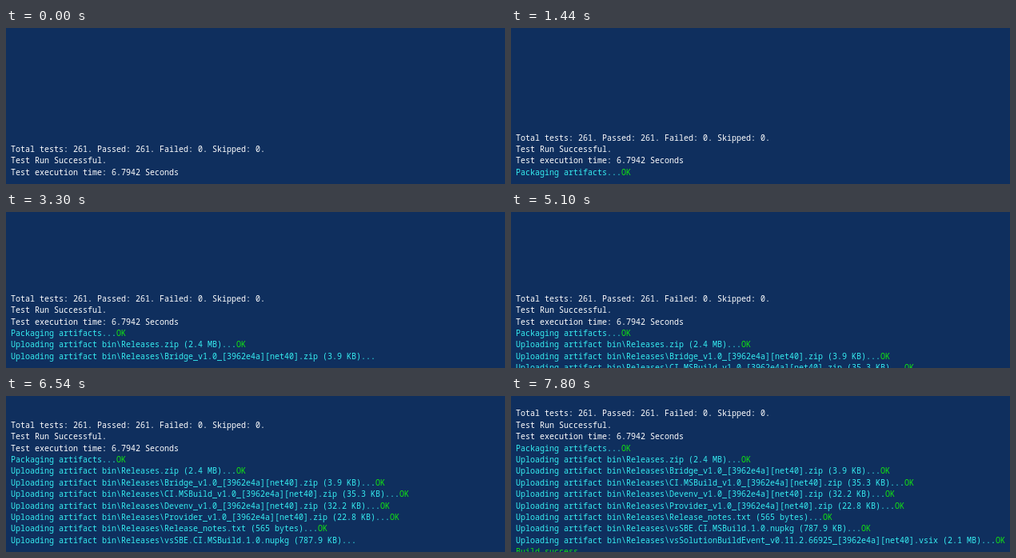
An HTML page with a canvas that plays this animation: 624x195 px, repeating every 8 s.

```html
<!DOCTYPE html>
<html lang="en">
<head>
<meta charset="utf-8">
<title>Build log</title>
<style>
html, body { margin: 0; width: 100%; height: 100%; overflow: hidden; background: #0f2f5e; }
canvas { display: block; }
</style>
</head>
<body>
<canvas id="stage" width="624" height="195"></canvas>
<script>
const ctx = document.getElementById('stage').getContext('2d');
const LOOP = 8000, LEFT = 6, CHAR = 6, PITCH = 14.4, BASE = 183.8;
const NAVY = '#0f2f5e', WHITE = '#ffffff', CYAN = '#36eef2', GREEN = '#12e412';

const upload = (file, size) => ({
  text: `Uploading artifact bin\\${file} (${size})...`, color: CYAN, ok: true
});
const tagged = (name, ext = 'zip') => `Releases\\${name}_[3962e4a][net40].${ext}`;

const lines = [
  { text: 'Total tests: 261. Passed: 261. Failed: 0. Skipped: 0.', color: WHITE },
  { text: 'Test Run Successful.', color: WHITE },
  { text: 'Test execution time: 6.7942 Seconds', color: WHITE },
  { text: 'Packaging artifacts...', color: CYAN, ok: true },
  upload('Releases.zip', '2.4 MB'),
  upload(tagged('Bridge_v1.0'), '3.9 KB'),
  upload(tagged('CI.MSBuild_v1.0'), '35.3 KB'),
  upload(tagged('Devenv_v1.0'), '32.2 KB'),
  upload(tagged('Provider_v1.0'), '22.8 KB'),
  upload('Releases\\Release_notes.txt', '565 bytes'),
  upload('Releases\\vsSBE.CI.MSBuild.1.0.nupkg', '787.9 KB'),
  upload(tagged('vsSolutionBuildEvent_v0.11.2.66925', 'vsix'), '2.1 MB'),
  { text: 'Build success', color: GREEN }
];

// time, index of the bottom full line, lines printed, lines finished
const steps = [
  [0, 2, 3, 3],
  [420, 3, 4, 3],
  [1320, 3, 4, 4],
  [1500, 4, 5, 4],
  [3240, 5, 6, 5],
  [4860, 5, 7, 6],
  [5040, 5, 7, 7],
  [5280, 8, 9, 8],
  [5940, 8, 10, 9],
  [6420, 10, 11, 10],
  [7260, 11, 12, 11],
  [7680, 11, 13, 12]
];

function print(text, col, y, color) {
  ctx.fillStyle = color;
  ctx.fillText(text, LEFT + col * CHAR, y);
}

function draw(t) {
  const [, bottom, printed, done] = steps.findLast(s => s[0] <= t);
  ctx.fillStyle = NAVY;
  ctx.fillRect(0, 0, 624, 195);
  ctx.font = '10px "Noto Sans Mono", "DejaVu Sans Mono", monospace';
  ctx.textBaseline = 'alphabetic';
  lines.slice(0, printed).forEach((line, i) => {
    const y = Math.round(BASE + (i - bottom) * PITCH);
    print(line.text, 0, y, line.color);
    if (line.ok && i < done) print('OK', line.text.length, y, GREEN);
  });
}

const start = performance.now();
function tick() {
  draw((performance.now() - start) % LOOP);
  requestAnimationFrame(tick);
}
tick();
</script>
</body>
</html>
```
